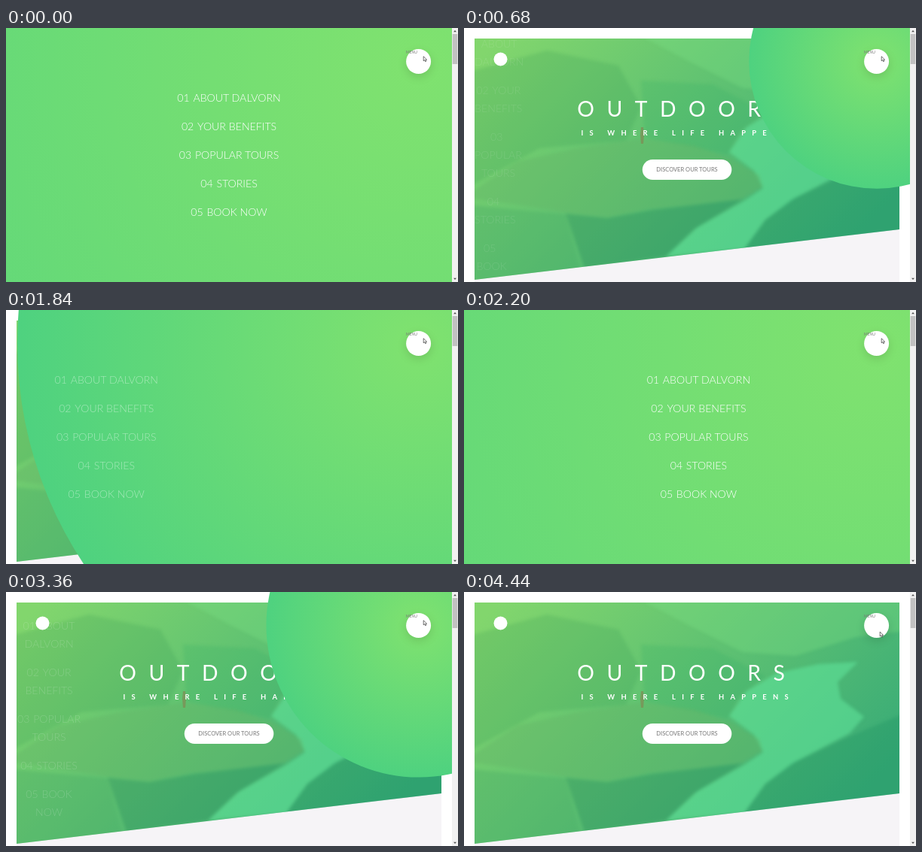
Write an HTML page that moves like this. It is 600x338 px and loops after 4.48 s.

```html
<!DOCTYPE html>
<html lang="en">
<head>
<meta charset="utf-8">
<title>Outdoors menu</title>
<style>
  html, body { margin: 0; width: 100%; height: 100%; overflow: hidden; background: #fff; }
  body { position: relative; font-family: Lato, sans-serif; }
  svg { position: absolute; left: 0; top: 0; width: 600px; height: 338px; }
  nav { position: absolute; left: 0; top: 0; height: 338px; display: flex; align-items: center; }
  ul { flex: none; width: 100%; min-width: 0; margin: 0; padding: 0; list-style: none; text-align: center; }
  li { margin: 4.71px; font-size: 14.13px; line-height: 24px; font-weight: 300; color: #fff; }
  li a { display: inline-block; padding: 4.71px 9.42px; }
  li span { display: inline-block; margin-right: 4.71px; }
  .button { filter: drop-shadow(0 4.7px 6px rgba(0, 0, 0, .12)); }
</style>
</head>
<body>
<svg viewBox="0 0 600 338">
  <defs>
    <linearGradient id="tint" gradientUnits="userSpaceOnUse" x1="80" y1="-20" x2="450" y2="350">
      <stop stop-color="#82d66d"/><stop offset="1" stop-color="#38ab77"/>
    </linearGradient>
    <radialGradient id="glow" r=".707">
      <stop stop-color="#80e26f"/><stop offset="1" stop-color="#3acb86"/>
    </radialGradient>
    <clipPath id="slant"><path d="M14 14H578V268L14 335Z"/></clipPath>
  </defs>
  <path d="M14 260H578V338H14Z" fill="#f6f4f7"/>
  <g clip-path="url(#slant)">
    <path d="M0 0H600V338H0Z" fill="url(#tint)"/>
    <g style="filter:blur(2px)">
      <path d="M215 0H600V50L520 60 440 85 370 80 300 45Z" fill="#7be084" opacity=".35"/>
      <path d="M0 60L110 30 205 50 235 105 215 150 100 160 0 215Z" fill="#2f8f50" opacity=".18"/>
      <path d="M235 70L330 75 400 112 365 138 350 168 240 146Z" fill="#2fa863" opacity=".2"/>
      <path d="M523 93L470 96 415 108 375 132 352 165 385 190 397 213 372 230 310 265 268 304 372 294 400 255 440 226 512 188 531 166 500 142 496 120Z" fill="#5fe39a" opacity=".6"/>
      <path d="M600 155L510 193 435 228 400 256 368 300 600 280Z" fill="#1b8f62" opacity=".3"/>
      <path d="M0 225L70 178 150 160 236 147 305 156 355 174 392 196 396 212 368 228 300 236 245 241 190 252 135 246 70 235Z" fill="#65b568" opacity=".4"/>
      <path d="M135 247L190 253 250 242 370 228 305 268 268 304 160 320Z" fill="#23865a" opacity=".35"/>
      <path d="M0 235L135 248 160 340H0Z" fill="#43a763" opacity=".3"/>
    </g>
    <path d="M235 132h3l1 10-1 12h-3l-1-12Z" fill="#86804f" opacity=".6"/>
  </g>
  <circle cx="48.5" cy="41.5" r="9" fill="#fff"/>
  <g fill="#fff">
    <text x="150.3" y="118" font-size="28.3" letter-spacing="16.5">OUTDOORS</text>
    <text x="155.4" y="142.8" font-size="9.42" font-weight="700" letter-spacing="8.24">IS WHERE LIFE HAPPENS</text>
    <rect x="236.8" y="175" width="118.5" height="27" rx="13.5"/>
  </g>
  <text x="296" y="191.3" font-size="7.54" fill="#777" text-anchor="middle">DISCOVER OUR TOURS</text>
  <circle id="cover" cx="547.6" cy="44.5" fill="url(#glow)"/>
</svg>

<nav id="nav"><ul>
  <li><a><span>01</span>ABOUT DALVORN</a></li>
  <li><a><span>02</span>YOUR BENEFITS</a></li>
  <li><a><span>03</span>POPULAR TOURS</a></li>
  <li><a><span>04</span>STORIES</a></li>
  <li><a><span>05</span>BOOK NOW</a></li>
</ul></nav>

<svg viewBox="0 0 600 338">
  <circle class="button" cx="547.6" cy="44.5" r="16.5" fill="#fff"/>
  <text x="531" y="33.6" font-size="5" fill="#777">MENU</text>
  <path id="cursor" d="M0 0V6L1.4 4.8 2.4 7 3.5 6.5 2.6 4.4H4.4Z" fill="#fff" stroke="#333" stroke-width=".7"/>
  <path d="M592 0H600V338H592Z" fill="#f1f1f1"/>
  <path d="M592.7 8H599.3V48H592.7Z" fill="#c1c1c1"/>
  <path d="M594 5.2L596 3 598 5.2ZM594 332.8L596 335 598 332.8Z" fill="#505050"/>
</svg>

<script>
const LOOP = 4480, SPAN = 800;
const CLOSE = 212, REOPEN = 1465, CLOSE_AGAIN = 2910, NAV_LAG = 13;
const $ = id => document.getElementById(id);
const clamp = v => Math.min(1, Math.max(0, v));

function bezier(x1, y1, x2, y2) {
  const at = (s, a, b) => 3 * (1 - s) ** 2 * s * a + 3 * (1 - s) * s * s * b + s ** 3;
  return x => {
    if (x <= 0 || x >= 1) return clamp(x);
    let lo = 0, hi = 1;
    for (let i = 0; i < 30; i++) {
      const mid = (lo + hi) / 2;
      if (at(mid, x1, x2) < x) lo = mid; else hi = mid;
    }
    return at(lo, y1, y2);
  };
}
const sweep = bezier(.86, 0, .07, 1);
const bounce = bezier(.68, -.55, .265, 1.55);

// 1 = menu open, 0 = closed
function openness(t, ease, lag) {
  const run = start => ease((t - start) / SPAN);
  if (t < REOPEN) return 1 - run(CLOSE + lag);
  if (t < CLOSE_AGAIN) return run(REOPEN);
  return 1 - run(CLOSE_AGAIN + lag);
}

function draw(now) {
  const t = now % LOOP;
  $('cover').setAttribute('r', 14.14 * (1 + 79 * openness(t, sweep, 0)));

  const shown = openness(t, bounce, NAV_LAG);
  $('nav').style.width = Math.max(0, shown) * 592 + 'px';
  $('nav').style.opacity = clamp(shown);

  const k = clamp((t - 4280) / 160), move = k * k * (3 - 2 * k);
  $('cursor').setAttribute('transform', `translate(${554.2 - 2 * move} ${37.8 + 15.2 * move})`);
}

const start = performance.now();
function tick() {
  draw(performance.now() - start);
  requestAnimationFrame(tick);
}
tick();
</script>
</body>
</html>
```
